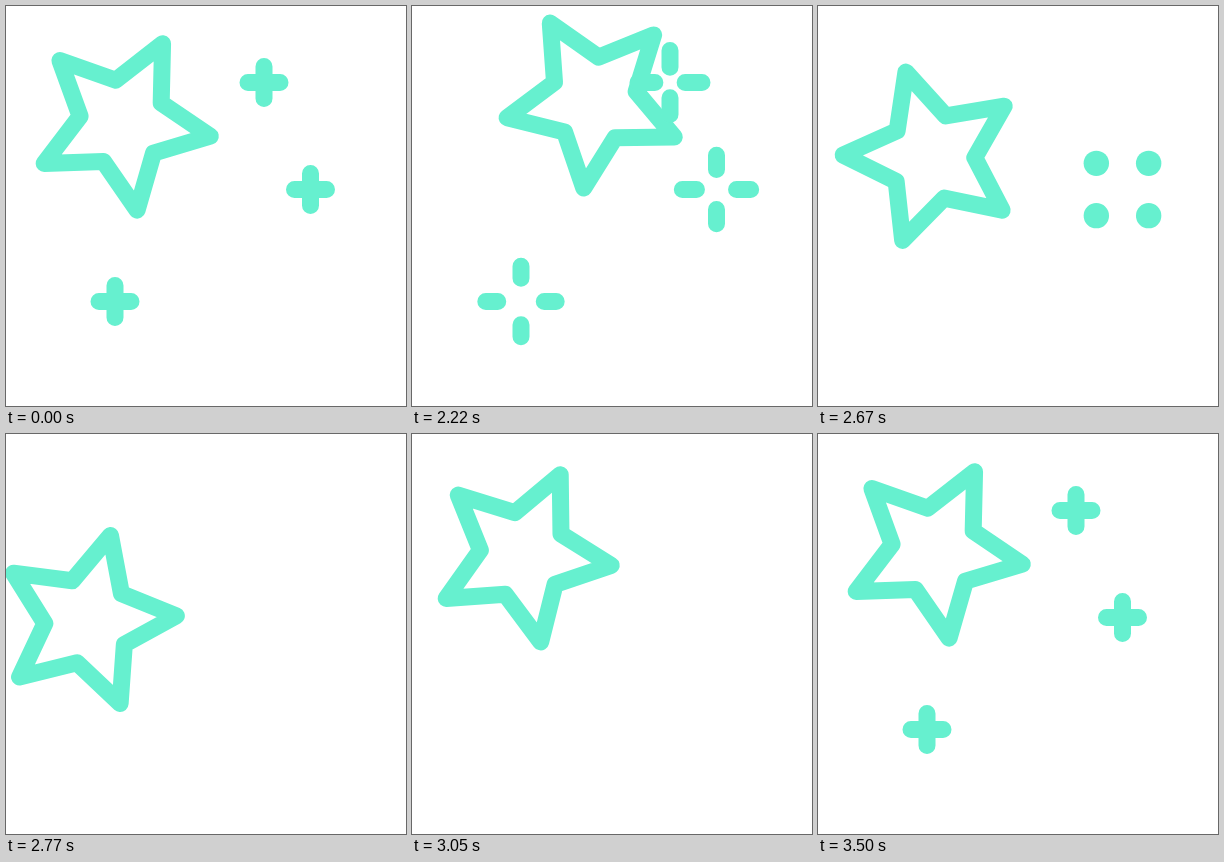
Recreate the animation shown at these times as an HTML page with a canvas. Size 400 by 400 pixels, loop 3.52 s.

```html
<!DOCTYPE html>
<html lang="en">
<head>
<meta charset="utf-8">
<title>Star and sparkles</title>
<style>
  html, body { margin: 0; width: 100%; height: 100%; overflow: hidden; background: #fff; }
  canvas { display: block; width: 100vw; height: 100vh; }
</style>
</head>
<body>
<canvas></canvas>
<script>
const SIZE = 400, LOOP = 3520, START = 1995;
const COLOR = '#66f0cf', STROKE = 17;
const REST_ANGLE = 8.7, OUTER = 88.5, INNER = 43.2;
const ARM = 16, REACH = 37, DOT = 12.7;
const FLASH_STEP = 55, REGROW_START = 3110, REGROW_TIME = 350;

// time, x, y, rotation in degrees
const starKeys = [
  [START, 116.8, 116.8, 0],
  [2220, 181.6, 94.2, -56],
  [2330, 198, 89, -70],
  [2500, 198, 89, -70],
  [2670, 114, 150.4, 28],
  [2770, 82, 187, 60],
  [2830, 82, 187, 60],
  [2900, 86.4, 179.8, 51.7],
  [3050, 111.2, 121.2, -1.9],
  [3120, 116.8, 116.8, -8],
  [3290, 116.8, 116.8, 0]
];

const sparkles = [
  { x: 258, y: 76.5, burst: 410, flash: 2410 },
  { x: 304.5, y: 183.5, burst: 340, flash: 2590 },
  { x: 109, y: 295.5, burst: 308, flash: 2820 }
];

const canvas = document.querySelector('canvas');
const ctx = canvas.getContext('2d');
const clamp = v => Math.min(1, Math.max(0, v));
const easeOut = p => Math.sin(p * Math.PI / 2);
const rad = deg => deg * Math.PI / 180;

function slope(keys, i, c) {
  if (i === 0 || i === keys.length - 1) return 0;
  const rate = j => (keys[j + 1][c] - keys[j][c]) / (keys[j + 1][0] - keys[j][0]);
  const a = rate(i - 1), b = rate(i);
  return a * b <= 0 ? 0 : 2 * a * b / (a + b);
}

// Monotone cubic interpolation: no overshoot beyond the keys
function sample(keys, t, c) {
  const last = keys.length - 1;
  if (t <= keys[0][0]) return keys[0][c];
  if (t >= keys[last][0]) return keys[last][c];
  const i = keys.findIndex(k => k[0] > t) - 1;
  const [k, n] = [keys[i], keys[i + 1]];
  const span = n[0] - k[0], p = (t - k[0]) / span, q = 1 - p;
  return k[c] * q * q * (1 + 2 * p) + n[c] * p * p * (3 - 2 * p)
    + span * p * q * (q * slope(keys, i, c) - p * slope(keys, i + 1, c));
}

function drawStar(t) {
  const [x, y, turn] = [1, 2, 3].map(c => sample(starKeys, t, c));
  ctx.beginPath();
  for (let i = 0; i < 10; i++) {
    const r = i % 2 ? INNER : OUTER;
    const a = rad(REST_ANGLE + turn + i * 36);
    ctx.lineTo(x + r * Math.cos(a), y + r * Math.sin(a));
  }
  ctx.closePath();
  ctx.stroke();
}

function drawArms(x, y, from, to) {
  ctx.beginPath();
  for (const [dx, dy] of [[1, 0], [0, 1], [-1, 0], [0, -1]]) {
    ctx.moveTo(x + dx * from, y + dy * from);
    ctx.lineTo(x + dx * to, y + dy * to);
  }
  ctx.stroke();
}

function drawDots(x, y, turn) {
  for (let i = 0; i < 4; i++) {
    const a = rad(turn + i * 90);
    ctx.beginPath();
    ctx.arc(x + REACH * Math.cos(a), y + REACH * Math.sin(a), DOT, 0, Math.PI * 2);
    ctx.fill();
  }
}

function drawSparkle({ x, y, burst, flash }, t) {
  const p = clamp((t - START) / burst);
  if (p < 1) {
    drawArms(x, y, REACH * p ** 1.5, ARM + (REACH - ARM) * easeOut(p));
    return;
  }
  const step = Math.floor((t - flash) / FLASH_STEP);
  if (step === 0 || step === 1) drawDots(x, y, step * 45);
  if (t > REGROW_START) {
    drawArms(x, y, 0, ARM * easeOut(clamp((t - REGROW_START) / REGROW_TIME)));
  }
}

function resize() {
  const ratio = window.devicePixelRatio || 1;
  canvas.width = Math.round(innerWidth * ratio);
  canvas.height = Math.round(innerHeight * ratio);
}

function render(t) {
  ctx.setTransform(canvas.width / SIZE, 0, 0, canvas.height / SIZE, 0, 0);
  ctx.fillStyle = '#fff';
  ctx.fillRect(0, 0, SIZE, SIZE);
  ctx.fillStyle = ctx.strokeStyle = COLOR;
  ctx.lineWidth = STROKE;
  ctx.lineCap = ctx.lineJoin = 'round';
  drawStar(t);
  sparkles.forEach(s => drawSparkle(s, t));
}

const origin = performance.now();
function tick() {
  render((performance.now() - origin) % LOOP);
  requestAnimationFrame(tick);
}

addEventListener('resize', resize);
resize();
tick();
</script>
</body>
</html>
```
